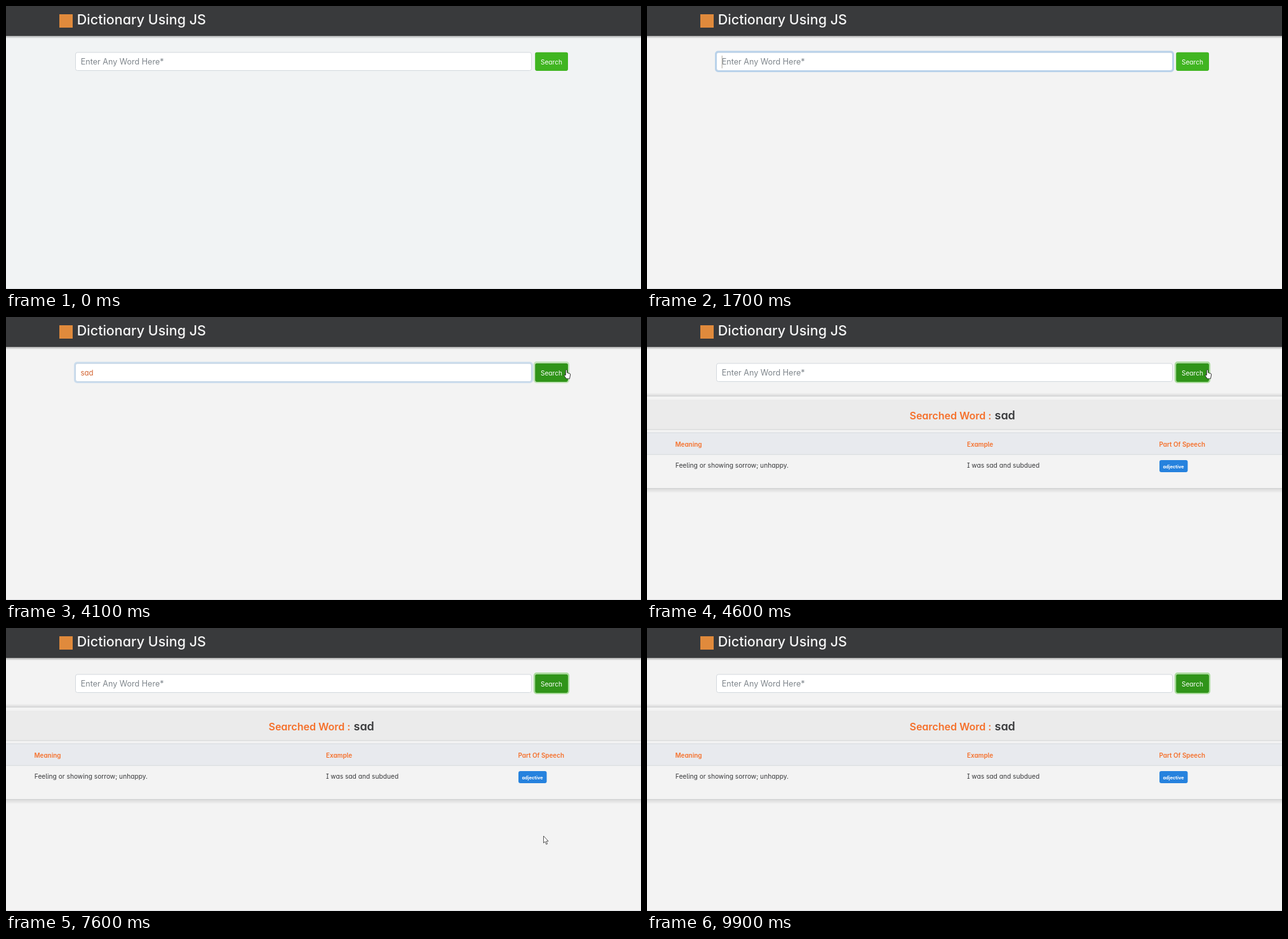
Recreate the animation shown at these times as an HTML page. Size 1000 by 445 pixels, loop 10000 ms.

```html
<!DOCTYPE html>
<html lang="en">
<head>
<meta charset="utf-8">
<title>Dictionary</title>
<style>
  html, body { margin: 0; width: 100%; height: 100%; overflow: hidden; background: #f3f3f3; }
  svg { display: block; width: 100vw; height: 100vh; }
  text {
    font-family: Inter, "Noto Sans", sans-serif;
    font-optical-sizing: none;
    font-feature-settings: "cv11", "cv08", "cv05";
    white-space: pre;
  }
  .orange { fill: #f5702b; }
  .dark { fill: #393a3c; }
  .head { font-size: 9.9px; font-weight: 600; }
  .cell { font-size: 10.2px; }
</style>
</head>
<body>
<svg viewBox="0 0 1000 445" preserveAspectRatio="none">
  <defs>
    <linearGradient id="fall" x2="0" y2="1">
      <stop offset="0" stop-color="#000" stop-opacity=".3"/>
      <stop offset="1" stop-color="#000" stop-opacity="0"/>
    </linearGradient>
    <linearGradient id="rise" y1="1" x2="0" y2="0">
      <stop offset="0" stop-color="#000" stop-opacity=".1"/>
      <stop offset="1" stop-color="#000" stop-opacity="0"/>
    </linearGradient>
  </defs>

  <rect id="page" width="1000" height="445" fill="#f3f3f3"/>
  <rect y="444" width="1000" height="1" fill="#dcdfe2"/>

  <rect y="47" width="1000" height="4" fill="url(#fall)"/>
  <rect width="1000" height="47" fill="#393a3c"/>
  <rect x="84" y="13" width="21" height="21" fill="#e08a3c"/>
  <text x="111.8" y="29.4" font-size="21.5" font-weight="450" fill="#f6f6f6">Dictionary Using JS</text>

  <rect x="109.5" y="73" width="718" height="28.5" rx="3" fill="#fff" stroke="#d3d8dd"/>
  <rect id="inputRing" x="108.5" y="72" width="720" height="30.5" rx="3.5" fill="none" stroke="#b9d2ea" stroke-width="3"/>
  <text id="hint" x="117.8" y="92.2" font-size="12.55" fill="#7f868c">Enter Any Word Here*</text>
  <text id="word" x="117.5" y="92.2" font-size="11.5" fill="#d2622f">sad</text>
  <rect id="caret" y="78" width="1.2" height="20" fill="#d3a58c"/>

  <rect id="buttonRing" x="832" y="71.2" width="54" height="31.6" rx="3.5" fill="none" stroke="#a9dc9b" stroke-width="2.4"/>
  <rect id="button" x="833.2" y="72.7" width="51.8" height="29.2" rx="2.8" fill="#40b521"/>
  <text x="842" y="91.8" font-size="10.1" fill="#fff">Search</text>

  <g id="result">
    <rect y="119" width="1000" height="5" fill="url(#rise)"/>
    <rect y="124" width="1000" height="1" fill="#d2d3d4"/>
    <rect y="130" width="1000" height="47" fill="#ebebeb"/>
    <rect y="176.5" width="1000" height="1" fill="#d2d3d4"/>
    <text class="orange" x="413.5" y="161" font-size="16" font-weight="600">Searched Word :</text>
    <text class="dark" x="547.5" y="161" font-size="18" font-weight="600">sad</text>

    <rect y="181.5" width="1000" height="34.5" fill="#e8eaee"/>
    <rect y="181.5" width="1000" height="1" fill="#dadde1"/>
    <rect y="215.7" width="1000" height="1" fill="#d6d9dd"/>
    <text class="orange head" x="44.5" y="203.5">Meaning</text>
    <text class="orange head" x="504" y="203.5">Example</text>
    <text class="orange head" x="806.5" y="203.5">Part Of Speech</text>
    <text class="dark cell" x="44.8" y="237">Feeling or showing sorrow; unhappy.</text>
    <text class="dark cell" x="504" y="237">I was sad and subdued</text>
    <rect x="807" y="225" width="44.5" height="19" rx="3" fill="#2682de"/>
    <text x="812.5" y="237.6" font-size="7.3" font-weight="700" fill="#fff">adjective</text>
    <rect y="269" width="1000" height="1" fill="#d0d1d2"/>
    <rect y="270" width="1000" height="7" fill="url(#fall)" opacity=".35"/>
  </g>

  <g id="pointer">
    <path id="arrow" d="M0 0V11L2.5 8.8L4.3 13.2L6.1 12.4L4.3 8.2H7.6Z" fill="#fff" stroke="#333" stroke-width=".8"/>
    <path id="beam" d="M-2 -7H2M0 -7V7M-2 7H2" fill="none" stroke="#555" stroke-width="1"/>
    <path id="hand" d="M-1.2 7V.8Q0 -.8 1.2 .8V4.6L5.6 6Q6.4 6.4 6.2 8L5 14H-.2L-3.6 9Q-3.6 7 -1.2 8.6Z" fill="#fff" stroke="#222" stroke-width=".9"/>
  </g>
</svg>
<script>
const LOOP = 10000, STEP = 100;
const el = id => document.getElementById(id);
const show = (id, on) => el(id).setAttribute("opacity", Number(on));
const between = (t, a, b) => t >= a && t < b;
const clamp = v => Math.max(0, Math.min(1, v));

// Each run: time visible from, until, then points of [time, x, y].
const runs = [
  [200, 1600, [[200, 360, 432], [600, 250, 240], [900, 150, 118], [1100, 119, 88]]],
  [3400, 9900, [
    [3400, 300, 90], [3500, 520, 96], [3600, 710, 97], [3700, 840, 92], [3800, 882.5, 83],
    [6100, 882.5, 83], [6200, 880, 93], [6300, 872, 121], [6400, 865, 158], [6500, 859, 196],
    [6700, 851, 270], [6900, 846.5, 327],
    [7600, 846.5, 327], [7800, 845, 358], [8000, 843, 377]
  ]]
];

function along(points, t) {
  const i = points.findIndex(p => p[0] > t);
  if (i < 0) return points[points.length - 1].slice(1);
  const [t0, x0, y0] = points[i - 1], [t1, x1, y1] = points[i];
  const k = (t - t0) / (t1 - t0);
  return [x0 + (x1 - x0) * k, y0 + (y1 - y0) * k];
}

function drawPointer(t) {
  const run = runs.find(([from, until]) => between(t, from, until));
  show("pointer", Boolean(run));
  if (!run) return;
  const [x, y] = along(run[2], t);
  const overButton = between(x, 833, 885) && between(y, 72, 102);
  const overInput = between(x, 109, 828) && between(y, 73, 102);
  el("pointer").setAttribute("transform", `translate(${x} ${y})`);
  show("hand", overButton);
  show("beam", overInput);
  show("arrow", !overButton && !overInput);
}

function draw(now) {
  const t = Math.floor((now % LOOP) / STEP) * STEP;
  const typed = between(t, 3300, 4600);
  const caretOn = between(t, 1600, 2200) || between(t, 2700, 3200) || between(t, 3300, 3800);

  el("page").setAttribute("fill", t < 200 ? "#f1f3f4" : "#f3f3f3");
  show("inputRing", clamp((t - 1400) / 150) * clamp((4200 - t) / 150));
  show("hint", !typed);
  show("word", typed);
  show("caret", caretOn);
  el("caret").setAttribute("x", typed ? 137.3 : 117.6);
  el("caret").setAttribute("fill", typed ? "#d3a58c" : "#b9b3ad");

  show("buttonRing", clamp((t - 4000) / 150));
  el("button").setAttribute("fill", t >= 3800 ? "#309419" : "#40b521");
  show("result", t >= 4600);
  drawPointer(t);
}

function tick() {
  draw(performance.now());
  requestAnimationFrame(tick);
}
tick();
</script>
</body>
</html>
```
